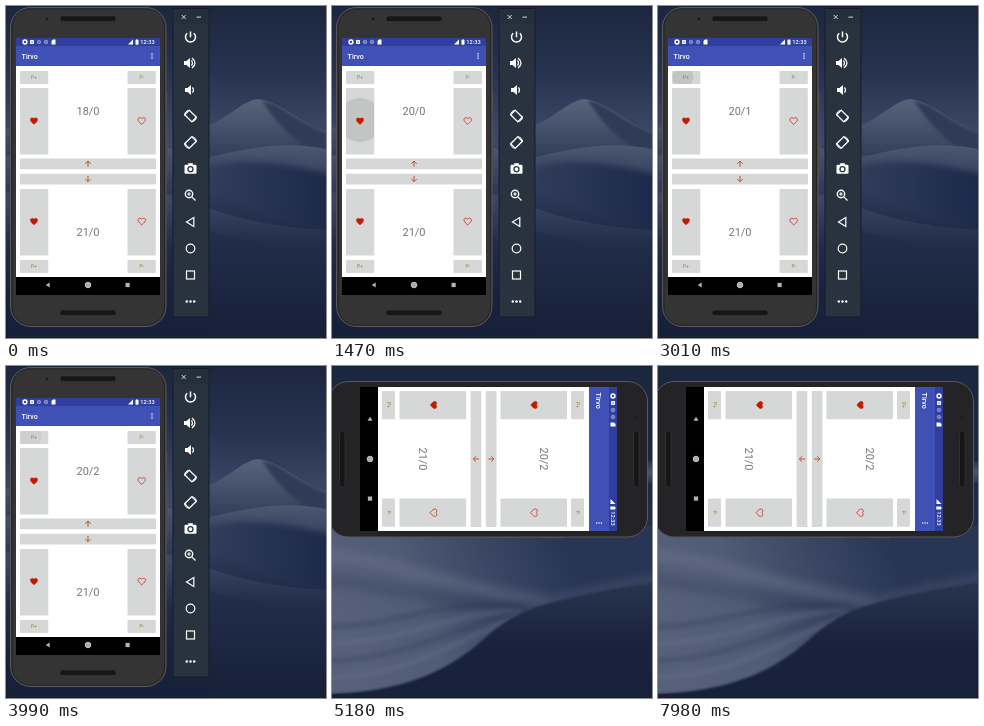
These frames come from a looping animation (320 by 332 pixels, 8 s). An HTML page with a canvas:

```html
<!DOCTYPE html>
<html lang="en">
<head>
<meta charset="utf-8">
<title>Counter app</title>
<style>
html, body { margin: 0; width: 100%; height: 100%; overflow: hidden; background: #18213a; }
canvas { display: block; width: 320px; height: 332px; }
</style>
</head>
<body>
<canvas id="stage"></canvas>
<script>
const W = 320, H = 332, LOOP = 8000, STEP = 70, TURN = 5180;
const canvas = document.getElementById('stage');
const c = canvas.getContext('2d');
const dpr = window.devicePixelRatio || 1;
canvas.width = W * dpr;
canvas.height = H * dpr;

// Tap start, x, y, full radius, fade start, fade end
const taps = [
  [210, 28, 114, 22, 500, 840, 'heart'],
  [1190, 28, 114, 22, 1680, 2030, 'heart'],
  [2800, 25, 71, 11, 3080, 3360, 'plus'],
  [3500, 25, 71, 11, 3780, 4130, 'plus']
];
const buttons = { heart: [14, 82, 28, 66.5], plus: [14, 65, 28, 13] };
const clamp = v => Math.max(0, Math.min(1, v));

function rect(x, y, w, h, fill) {
  c.fillStyle = fill;
  c.fillRect(x, y, w, h);
}
function round(x, y, w, h, r, fill, stroke, lw = 1) {
  c.beginPath();
  c.roundRect(x, y, w, h, r);
  if (fill) { c.fillStyle = fill; c.fill(); }
  if (stroke) { c.strokeStyle = stroke; c.lineWidth = lw; c.stroke(); }
}
function disc(x, y, r, fill, stroke, lw = 1) {
  c.beginPath();
  c.arc(x, y, r, 0, 7);
  if (fill) { c.fillStyle = fill; c.fill(); }
  if (stroke) { c.strokeStyle = stroke; c.lineWidth = lw; c.stroke(); }
}
function shape(d, fill, stroke, lw = 1, x = 0, y = 0, turn = 0) {
  const p = new Path2D(d);
  c.save();
  c.translate(x, y);
  c.rotate(turn);
  if (fill) { c.fillStyle = fill; c.fill(p); }
  if (stroke) { c.strokeStyle = stroke; c.lineWidth = lw; c.stroke(p); }
  c.restore();
}
function text(s, x, y, size, fill, align = 'center', weight = 400) {
  c.font = `${weight} ${size}px Roboto, sans-serif`;
  c.textAlign = align;
  c.fillStyle = fill;
  c.fillText(s, x, y);
}
function fade(x0, y0, x1, y1, ...colors) {
  const g = c.createLinearGradient(x0, y0, x1, y1);
  colors.forEach((col, i) => g.addColorStop(i / (colors.length - 1), col));
  return g;
}
function soft(radius, paint) {
  c.save();
  c.filter = `blur(${radius * dpr}px)`;
  paint();
  c.restore();
}

function duskHills() {
  rect(0, 0, W, H, fade(0, 0, 0, 130, '#1c263e', '#26324f', '#3d4967'));
  shape('M0 122 Q60 110 110 134 T203 119 C222 112 238 94 252 93 C276 96 292 116 320 125 V332 H0Z',
    fade(0, 92, 0, 165, '#59637b', '#414c67', '#28334f'));
  soft(1.5, () => shape('M256 95 C276 97 292 118 320 127 V150 C290 140 272 118 256 95Z', '#303b58'));
  shape('M0 150 Q100 122 203 151 C240 143 276 134 320 143 V332 H0Z',
    fade(0, 138, 0, 225, '#4c5871', '#303c5a', '#202b4a'));
  soft(3, () => shape('M203 160 C246 151 282 158 330 170 V222 C276 216 240 196 203 185Z',
    fade(203, 0, 320, 0, '#303c5a', '#1d294a')));
  shape('M0 187 Q100 160 203 202 C240 216 282 222 320 224 V332 H0Z',
    fade(0, 195, 0, 332, '#3a4663', '#202b48', '#19233e', '#172039'));
  shape('M203 225 C245 238 275 237 320 243 V332 H203Z', fade(0, 225, 0, 320, '#232e4c', '#172139'));
}

function nightDunes() {
  rect(0, 0, W, H, fade(0, 0, 0, 215, '#1b263f', '#1c2843', '#273553'));
  rect(316, 95, 4, 22, fade(0, 95, 0, 117, '#26324f', '#4a5670', '#2a3653'));
  shape('M0 160 H320 V212 C280 217 240 228 215 238 C185 252 150 328 0 328Z',
    fade(10, 255, 225, 165, '#566079', '#505b75', '#3b4765', '#283554'));
  // Wind-blown folds, first the upper slope, then the lower ripples
  soft(5, () => {
    shape('M-10 188 C60 194 120 222 215 236', null, 'rgba(112,122,144,.4)', 12);
    shape('M-10 213 C60 220 110 240 205 242', null, 'rgba(40,51,78,.3)', 10);
    shape('M215 236 C250 226 285 220 330 211', null, 'rgba(90,101,126,.5)', 7);
  });
  soft(2, () => {
    for (let i = 0; i < 4; i++) {
      const y = 312 - i * 17;
      shape(`M-10 ${y} C70 ${y} 115 ${y - 32} 190 ${248 - i * 2}`,
        null, i % 2 ? 'rgba(42,53,80,.3)' : 'rgba(114,124,146,.3)', 5);
    }
  });
  soft(.8, () => shape(
    'M-5 328 C80 326 122 300 154 271 C176 251 198 242 220 237 C250 229 285 221 325 217 V337 H-5Z',
    fade(0, 220, 0, 332, '#28334e', '#19233e', '#17213a')));
}

function body(metal) {
  rect(159.5, 85, 1.8, 22, '#4a4a4b');
  rect(159.5, 129, 1.8, 49, '#4a4a4b');
  round(4.5, 1.5, 155.5, 319, 20, metal, '#59595a');
  round(6, 3, 152.5, 316, 18, null, '#252527');
  for (const y of [10, 304]) round(54, y, 56, 5.5, 2.5, '#161617', '#3a3a3c', .6);
  disc(41, 13, 1.4, '#1b1b1e');
}

function heart(x, y, full) {
  shape('M0 3.4L-.6 2.9C-2.8 .9-3.7 0-3.7-1.3C-3.7-2.5-2.9-3.3-1.8-3.3C-1.1-3.3-.4-2.9 0-2.4C.4-2.9 1.1-3.3 1.8-3.3C2.9-3.3 3.7-2.5 3.7-1.3C3.7 0 2.8 .9 .6 2.9Z',
    full && '#c41a00', '#c62a18', full ? .3 : .8, x, y);
}

function statusBar() {
  disc(19, 36, 1.9, null, '#fff', 1.5);
  round(24, 34, 4, 4, .7, '#fff');
  rect(25.5, 35.2, 1, 1.6, '#303f9f');
  disc(33, 36, 1.8, '#6b77bd', '#8f99ce', .9);
  disc(40, 36, 1.8, '#6b77bd', '#8f99ce', .9);
  shape('M45.5 35L47 33.5H49.5V38.5H45.5Z', '#fff');
  shape('M122 38.5L127 33.5V38.5Z', '#fff');
  rect(129.5, 34, 3, 4.7, '#fff');
  rect(130.3, 33.3, 1.4, 1, '#fff');
  text('12:33', 148.7, 38.4, 5.7, '#fff', 'right', 500);
}

function ripples(t) {
  for (const [start, x, y, size, from, to, name] of taps) {
    if (t < start || t >= to) continue;
    c.save();
    c.beginPath();
    c.rect(...buttons[name]);
    c.clip();
    const grow = 1 - (1 - clamp((t - start) / 280)) ** 2;
    disc(x, y, size * (.25 + .75 * grow), `rgba(0,0,0,${.09 * (1 - clamp((t - from) / (to - from)))})`);
    c.restore();
  }
}

function screen(t) {
  rect(10, 32, 144, 257, '#fff');
  rect(10, 32, 144, 8, '#303f9f');
  rect(10, 40, 144, 20, '#3f51b5');
  statusBar();
  text('Tirvo', 15.6, 52.8, 7.1, '#fff', 'left', 500);
  for (const y of [47.7, 50, 52.3]) disc(146, y, .75, '#fff');

  const gray = '#d6d7d7';
  for (const x of [14, 121.5]) {
    for (const [y, h] of [[65, 13], [82, 66.5], [183, 66.5], [254, 13]]) round(x, y, 28.3, h, .8, gray);
  }
  for (const y of [152.5, 167.7]) round(14, y, 136, 10.7, .8, gray);
  ripples(t);
  for (const y of [73.3, 262.3]) {
    text('P+', 28, y, 5, '#8c8c45');
    text('P-', 135.7, y, 5, '#8c8c45');
  }
  for (const y of [115, 215.5]) {
    heart(28, y, true);
    heart(135.7, y, false);
  }
  const arrow = 'M0 3V-2.6M-2.7 0L0-2.7L2.7 0';
  shape(arrow, null, '#c62a18', .8, 82, 157.8);
  shape(arrow, null, '#c62a18', .8, 82, 173, Math.PI);

  const score = t < 350 ? '18/0' : t < 1330 ? '19/0' : t < 2940 ? '20/0' : t < 3640 ? '20/1' : '20/2';
  text(score, 82, 109.2, 11, '#757575');
  text('21/0', 82, 230.2, 11, '#757575');

  rect(10, 271, 144, 18, '#000');
  shape('M39.7 279L43.7 276.5V281.5Z', '#b5b5b5');
  disc(82, 279, 2.8, '#aaa', '#ddd', .8);
  rect(119.5, 276.9, 4.2, 4.2, '#b5b5b5');
}

function rotateIcon(y, flip) {
  c.save();
  c.translate(184.5, y);
  c.scale(flip, 1);
  shape('M-6-.5Q-6-5-1-6M6 .5Q6 5 1 6', null, '#fff', 1);
  c.rotate(-Math.PI / 4);
  round(-3.2, -5, 6.4, 10, .6, null, '#fff', 1.4);
  c.restore();
}

function speaker(y, loud) {
  const x = loud ? 182 : 183;
  shape('M-4-2H-1.5L2-5V5L-1.5 2H-4Z', '#fff', null, 1, x, y);
  shape('M3.5-2.6Q5.5 0 3.5 2.6', null, '#fff', 1.2, x, y);
  if (loud) shape('M4-5Q10 0 4 5', null, '#fff', 1.3, x, y);
}

function toolbar() {
  rect(166.5, 2, 37, 309.5, '#151c29');
  rect(167.5, 3, 35, 307.5, '#29323f');
  rect(167.5, 3, 35, 15, '#252e3b');
  const x = 184.5, ink = '#fff';
  shape('M-2-2L2 2M2-2L-2 2', null, '#d5d8dc', 1, 177.7, 11);
  rect(190.5, 10.6, 4.5, 1, '#d5d8dc');
  shape('M0-5.5V.3M-3.3-3.7A5 5 0 1 0 3.3-3.7', null, ink, 1.5, x, 31);
  speaker(57, true);
  speaker(84, false);
  rotateIcon(110, 1);
  rotateIcon(136.5, -1);
  round(x - 6, 158.7, 12, 9, 1.2, ink);
  rect(x - 2.3, 157.2, 4.6, 2, ink);
  disc(x, 163.2, 2.5, null, '#29323f', 1.3);
  disc(183, 188, 3.7, null, ink, 1.4);
  shape('M2.8 2.8L6.5 6.5M-1.8 0H1.8M0-1.8V1.8', null, ink, 1.2, 183, 188);
  shape('M3.3-4.4V4.4L-4 0Z', null, ink, 1.2, x, 216);
  disc(x, 242.5, 4.3, null, ink, 1.2);
  c.strokeRect(x - 4, 265, 8, 8);
  for (const d of [-3.7, 0, 3.7]) disc(x + d, 295.5, 1.2, ink);
}

function draw(t) {
  c.setTransform(dpr, 0, 0, dpr, 0, 0);
  if (t < TURN) {
    duskHills();
    body('#343435');
    screen(t);
    toolbar();
    return;
  }
  nightDunes();
  // Quarter turn clockwise: portrait y runs leftwards from x = 317
  c.setTransform(0, dpr, -dpr, 0, 317 * dpr, 11 * dpr);
  body('#242426');
  screen(t);
}

const began = performance.now();
let shown = -1;
function tick() {
  const t = Math.floor((performance.now() - began) % LOOP / STEP) * STEP;
  if (t !== shown) draw(shown = t);
  requestAnimationFrame(tick);
}
tick();
</script>
</body>
</html>
```
